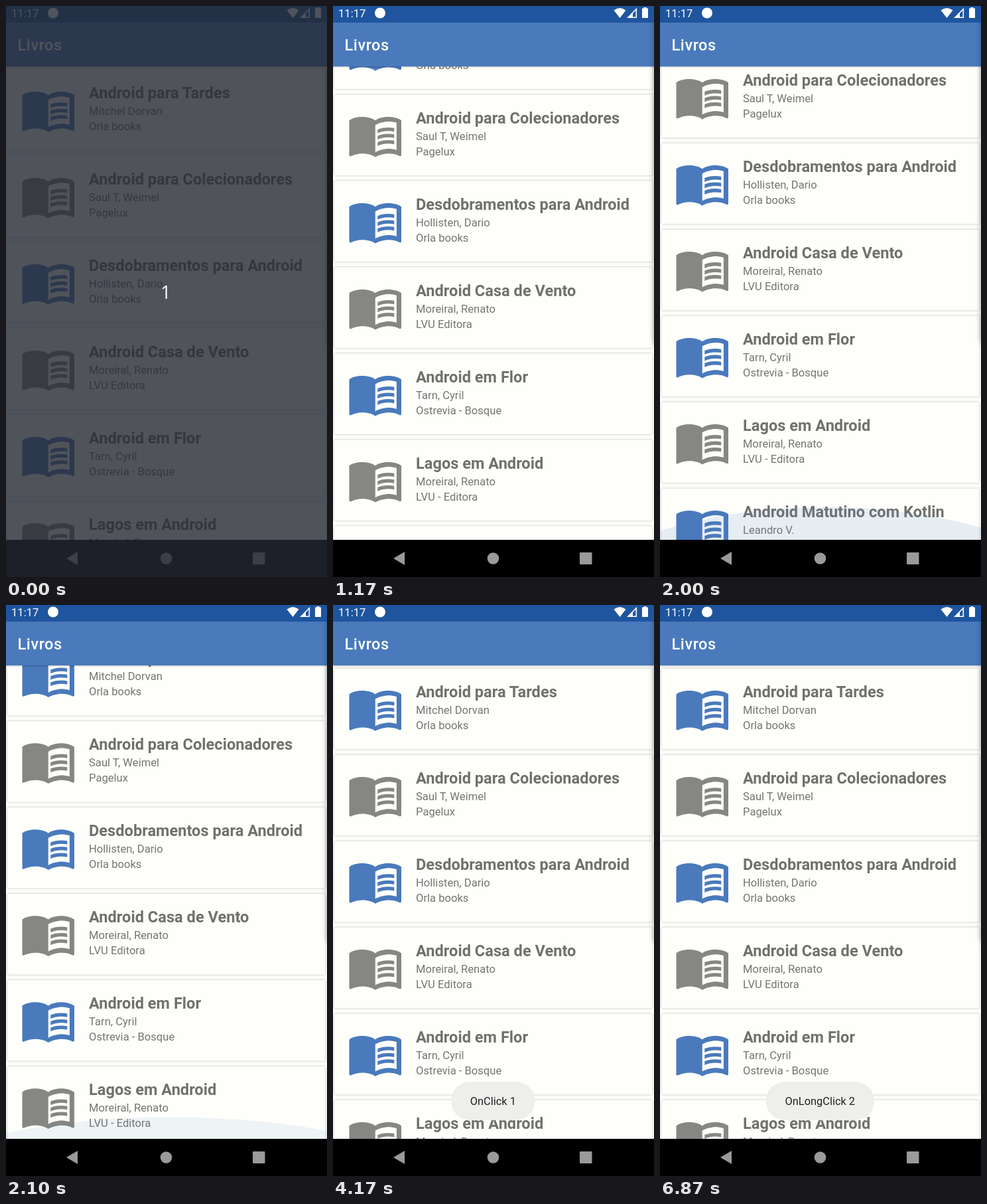
Write an HTML page that moves like this. It is 484 by 860 pixels and loops after 7.71 s.

```html
<!DOCTYPE html>
<html lang="pt">
<head>
<meta charset="utf-8">
<style>
  html, body { margin: 0; width: 100%; height: 100%; overflow: hidden; }
  svg { display: block; font-family: Roboto, sans-serif; }
  .card { fill: #fefffb; filter: drop-shadow(0 0 .8px rgba(0, 0, 0, .14)) drop-shadow(0 .8px .8px rgba(0, 0, 0, .18)); }
  .title { font-size: 23.6px; font-weight: 700; fill: #70716d; }
  .line { font-size: 16.6px; fill: #747571; }
  .edge { filter: blur(5px); opacity: .32; }
</style>
</head>
<body>
<svg id="stage" width="484" height="860" viewBox="0 0 484 860">
  <defs>
    <g id="book">
      <path d="M21 5c-1.11-.35-2.33-.5-3.5-.5-1.95 0-4.05.4-5.5 1.5-1.45-1.1-3.55-1.5-5.5-1.5S2.45 4.9 1 6v14.65c0 .25.25.5.5.5.1 0 .15-.05.25-.05C3.1 20.45 5.05 20 6.5 20c1.95 0 4.05.4 5.5 1.5 1.35-.85 3.8-1.5 5.5-1.5 1.65 0 3.35.3 4.75 1.05.1.05.15.05.25.05.25 0 .5-.25.5-.5V6c-.6-.45-1.25-.75-2-1zm0 13.5c-1.1-.35-2.3-.5-3.5-.5-1.7 0-4.15.65-5.5 1.5V8c1.35-.85 3.8-1.5 5.5-1.5 1.2 0 2.4.15 3.5.5z"/>
      <path id="stripe" d="M17.5 10.5c.88 0 1.73.09 2.5.26V9.24c-.79-.15-1.64-.24-2.5-.24-1.7 0-3.24.29-4.5.83v1.66c1.13-.64 2.7-.99 4.5-.99z"/>
      <use href="#stripe" y="2.66"/>
      <use href="#stripe" y="5.33"/>
    </g>
  </defs>

  <rect width="484" height="860" fill="#fcfdf9"/>
  <svg y="91" width="484" height="713">
    <g id="list"></g>
    <svg width="484" height="130"><circle id="tap" cx="242" cy="65" opacity="0"/></svg>
    <svg y="130" width="484" height="130"><circle id="hold" cx="242" cy="65" opacity="0"/></svg>
    <ellipse id="topGlow" cx="262" fill="#4a7abc"/>
    <ellipse id="bottomGlow" cx="250" fill="#4a7abc"/>
  </svg>
  <g id="toasts" text-anchor="middle" font-size="16.4"></g>

  <rect y="25" width="484" height="66" fill="#4a7abc" style="filter:drop-shadow(0 1px 1px rgba(0,0,0,.25))"/>
  <rect class="edge" x="484" y="20" width="20" height="487"/>
  <rect width="484" height="25" fill="#1f559e"/>
  <g fill="#fff">
    <text x="17.5" y="67.2" font-size="23.5" font-weight="500" letter-spacing=".6">Livros</text>
    <text x="8" y="17.2" font-size="16.6">11:17</text>
    <circle cx="71" cy="10.5" r="8"/>
    <path d="M423.500 6.5Q432.500 -.5 441.500 6.500L432.500 18Z"/>
    <path d="M457.300 4.800V17.200H445Z" fill="none" stroke="#fff" stroke-width="1.6"/>
    <path d="M452 10V17H445Z"/>
    <path d="M468.500 3.500V2H472.500V3.500H475V18H466V3.500Z"/>
  </g>

  <rect y="804" width="484" height="56"/>
  <g fill="#9a9a98">
    <path d="M108 822V842L91 832Z"/>
    <circle cx="241.500" cy="832" r="8.800"/>
    <rect x="372" y="823" width="18.500" height="18" rx="1"/>
  </g>

  <g id="countdown">
    <rect width="484" height="860" fill="rgb(37,41,50)" opacity=".8"/>
    <text x="241" y="441" font-size="28" font-family="Open Sans, sans-serif" text-anchor="middle" fill="#fff">1</text>
  </g>
</svg>

<script>
const LOOP = 7710, ROW = 130, MAX_SCROLL = 194.4, VIEW = 713;
const books = [
  ["Android para Tardes", "Mitchel Dorvan", "Orla books"],
  ["Android para Colecionadores", "Saul T, Weimel", "Pagelux"],
  ["Desdobramentos para Android", "Hollisten, Dario", "Orla books"],
  ["Android Casa de Vento", "Moreiral, Renato", "LVU Editora"],
  ["Android em Flor", "Tarn, Cyril", "Ostrevia - Bosque"],
  ["Lagos em Android", "Moreiral, Renato", "LVU - Editora"],
  ["Android Matutino com Kotlin", "Leandro V.", "LUMAVEX"],
];
const $ = id => document.getElementById(id);
const set = (el, attrs) => { for (const k in attrs) el.setAttribute(k, attrs[k]); };

$("list").innerHTML = books.map(([title, author, publisher], i) => `
  <g transform="translate(0 ${i * ROW})">
    <rect class="card" x="2" y="4.500" width="479.500" height="122" rx="2"/>
    <use href="#book" transform="translate(20.900 22) scale(3.570)" fill="${i % 2 ? "#868782" : "#4a7abc"}"/>
    <text class="title" x="125" y="48">${title}</text>
    <text class="line" x="125" y="73">${author}</text>
    <text class="line" x="125" y="96">${publisher}</text>
  </g>`).join("");

$("toasts").innerHTML = [["OnClick 1", 126], ["OnLongClick 2", 163]].map(([label, width]) => `
  <g>
    <rect x="${241.3 - width / 2}" y="718" width="${width}" height="58" rx="28" fill="#eeefec"/>
    <text x="241.300" y="753" fill="#222">${label}</text>
  </g>`).join("");
const [clickToast, longToast] = $("toasts").children;

const ramp = (t, from, to) => Math.min(1, Math.max(0, (t - from) / (to - from)));
const smooth = u => u * u * (3 - 2 * u);
const easeOut = u => 1 - (1 - u) ** 2;

// Overscroll glow: a wide circle squashed against the list edge
function drawGlow(el, level, peak, atBottom) {
  const radius = 484 * 1.2, depth = radius * Math.cos(Math.PI / 6), scale = level * peak;
  set(el, {
    cy: atBottom ? VIEW + depth * scale : -depth * scale,
    rx: radius, ry: radius * scale,
    opacity: .155 * Math.min(1, level * 1.1),
  });
}

function drawRipple(el, t, start, fade) {
  set(el, {
    r: 145 + 130 * easeOut(ramp(t, start, start + 225)),
    opacity: .12 * ramp(t, start, start + 75) * (1 - fade),
  });
}

function draw(t) {
  $("countdown").style.display = t < 30 ? "" : "none";

  const scroll = MAX_SCROLL * (smooth(ramp(t, 976, 1380)) - smooth(ramp(t, 1912, 2196)));
  set($("list"), { transform: `translate(0 ${-scroll})` });

  const pullRelease = (from, to, release) =>
    easeOut(ramp(t, from, to)) * (1 - easeOut(ramp(t, release, release + 600)));
  drawGlow($("bottomGlow"), pullRelease(1420, 1770, 1930), .82, true);
  drawGlow($("topGlow"), pullRelease(2196, 2430, 2560), .755, false);

  drawRipple($("tap"), t, 3650, ramp(t, 3880, 4040));
  drawRipple($("hold"), t, 5710, t < 6870 ? 0 : 1);

  set(clickToast, { opacity: easeOut(ramp(t, 3760, 4170)) * (1 - easeOut(ramp(t, 5760, 6150))) });
  set(longToast, { opacity: easeOut(ramp(t, 6170, 6470)) });
}

const begin = performance.now();
function tick() {
  draw((performance.now() - begin) % LOOP);
  requestAnimationFrame(tick);
}
tick();
</script>
</body>
</html>
```
